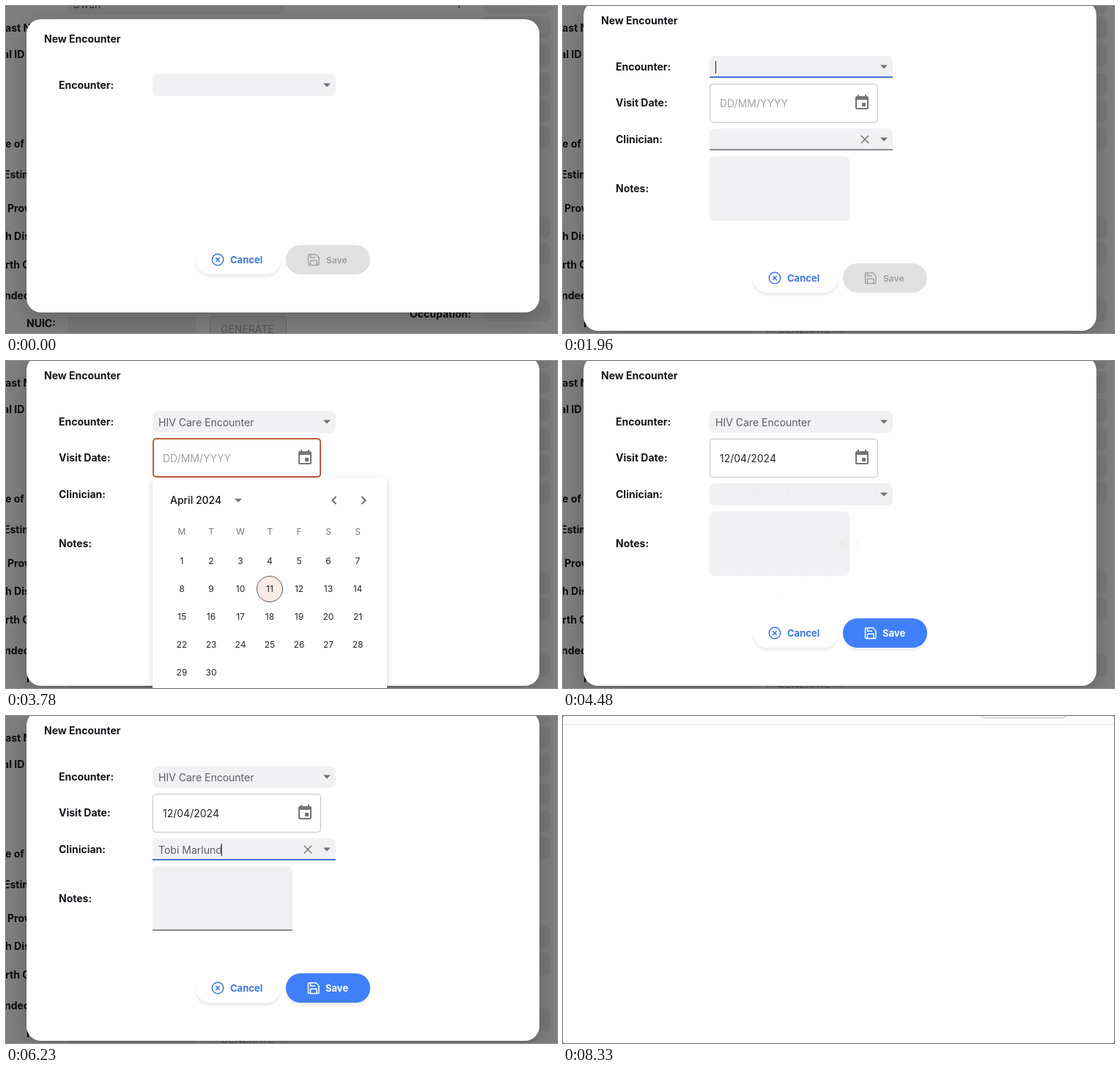
Animation of 752 by 446 pixels, one loop 8.61 s. Source, as an HTML page:

```html
<!DOCTYPE html>
<html lang="en">
<head>
<meta charset="utf-8">
<title>New Encounter</title>
<style>
html, body { margin: 0; width: 100%; height: 100%; overflow: hidden; background: #fff; }
svg { display: block; width: 752px; height: 446px; font: 400 14px Inter, sans-serif; }
.b { font-weight: 700; }
.mid { text-anchor: middle; }
.fit { transform-box: fill-box; transform-origin: center; }
.dialog { filter: drop-shadow(0 9px 16px rgba(0,0,0,.22)); }
.pill { filter: drop-shadow(0 4px 1.5px rgba(0,0,0,.07)); }
.lift { filter: drop-shadow(0 2px 1.5px rgba(0,0,0,.32)); }
.menu { filter: drop-shadow(0 1px 1.5px rgba(0,0,0,.28)); }
.sheet { filter: drop-shadow(0 3px 5px rgba(0,0,0,.16)); }
</style>
</head>
<body>
<svg id="stage" viewBox="0 0 752 446"></svg>
<script>
const LOOP = 8610;
const BLUE = '#3f78dc', INK = '#15151b', SOFT = '#f1f1f3', RUST = '#c05c3a', GREY = '#757575';
const EASE = 'cubic-bezier(.4,0,.2,1)', OUT = 'cubic-bezier(0,0,.2,1)';
const stage = document.getElementById('stage');

// drawing helpers
function add(parent, tag, attrs = {}, text) {
  const n = document.createElementNS('http://www.w3.org/2000/svg', tag);
  for (const k in attrs) n.setAttribute(k, attrs[k]);
  if (text !== undefined) n.textContent = text;
  parent.appendChild(n);
  return n;
}
const group = (p, attrs) => add(p, 'g', attrs);
const rect = (p, x, y, width, height, fill, rx = 0, more) =>
  add(p, 'rect', { x, y, width, height, fill, rx, ...more });
const text = (p, x, y, s, fill = INK, more) => add(p, 'text', { x, y, fill, ...more }, s);
const bold = (p, x, y, s, fill = INK, more) => text(p, x, y, s, fill, { class: 'b', ...more });
const line = (p, d, stroke, w, more) =>
  add(p, 'path', { d, stroke, 'stroke-width': w, fill: 'none', ...more });
const caret = (p, x, y) => rect(p, x, y, 1, 17, '#222');

// timing helpers: keys are [ms, value, easing]; both ends of the loop get one key each
function track(node, prop, keys) {
  const first = keys[0], last = keys[keys.length - 1], all = [...keys];
  if (first[0] > 0) all.unshift([0, first[1]]);
  if (last[0] < LOOP) all.push([LOOP, last[1]]);
  node.animate(all.map(([t, v, easing = 'linear']) => ({ offset: t / LOOP, [prop]: v, easing })),
    { duration: LOOP, iterations: Infinity });
}
function pulse(node, prop, off, on, rise, fall, spans, ease) {
  track(node, prop, spans.flatMap(([a, b = LOOP]) => [
    ...(a > 0 ? [[a, off, ease], [a + rise, on]] : [[0, on]]),
    ...(b < LOOP ? [[b, on, ease], [b + fall, off]] : [[LOOP, on]])]));
}
const show = (node, ...spans) => pulse(node, 'opacity', 0, 1, 0, 0, spans);
const fade = (node, ms, ...spans) => pulse(node, 'opacity', 0, 1, ms, ms, spans);
const widen = (node, ...spans) => pulse(node, 'transform', 'scaleX(0)', 'scaleX(1)', 200, 200, spans, OUT);

// page behind the dialog
const page = group(stage);
rect(page, 0, 0, 752, 446, '#fff');
rect(page, 84, -20, 296, 32, SOFT, 7);
text(page, 91, 3, 'Owen', '#555');
bold(page, 630, -1, 'Group:', INK, { 'text-anchor': 'end' });
[-20, 14, 52, 92, 128, 165, 287, 323, 400].forEach(y => rect(page, 652, y, 91, 30, SOFT, 7));
rect(page, 84, 424, 176, 30, SOFT, 7);
[['ast Name:', -1, 30], ['al ID', -4, 66], ['e of Birth:', -1, 188], ['Estimated:', -3, 230],
 ['Province:', 2, 276], ['h District:', -1, 314], ['rth Country:', -1, 353], ['nded:', -2, 395],
 ['NUIC:', 28, 433], ['Occupation:', 551, 420]].forEach(([s, x, y]) => bold(page, x, y + 5, s));
rect(page, 278.5, 423.5, 104, 36, '#f4f4f4', 4, { stroke: '#cfcfcf' });
text(page, 293, 446, 'GENERATE', '#a8a8a8');

const blank = group(stage);
rect(blank, 0, 0, 752, 446, '#fff');
rect(blank, 0, 11, 752, 1, '#dedede');
rect(blank, 566.5, -30, 124, 32.5, 'none', 10, { stroke: '#b4b4b8' });
show(blank, [7980]);

// dialog
const modal = group(stage);
track(modal, 'opacity', [[7850, 1, EASE], [8310, 0]]);
rect(modal, 0, 0, 752, 446, 'rgba(0,0,0,.5)');
const small = rect(modal, 28, 18, 700, 400, '#fff', 20, { class: 'dialog' });
const large = rect(modal, 28, -7, 700, 450, '#fff', 20, { class: 'dialog' });
show(small, [0, 1960]);
show(large, [1960]);

const head = group(modal), foot = group(modal), rest = group(modal);
const shift = (g, y) => pulse(g, 'transform', 'translate(0,0)', `translate(0,${y}px)`, 0, 0, [[0, 1960]]);
shift(head, 25);
shift(foot, -25);
show(rest, [1960]);

function underlines(p, y, w) {
  return {
    grey: rect(p, 200, y, w, 2, '#8c8c92'),
    blue: rect(p, 200, y, w, 2, BLUE, 0, { class: 'fit' })
  };
}
function select(p, y) {
  rect(p, 200, y, 250, 30, SOFT, 7);
  const halo = add(p, 'circle', { cx: 437.5, cy: y + 14, r: 12.3, fill: '#e2e2e5' });
  const arrow = add(p, 'path', { d: `M433 ${y + 12.5}h10l-5 5z`, fill: '#6f6f74', class: 'fit' });
  return { halo, arrow, ...underlines(p, y + 28, 250) };
}
function menu(p, y, names) {
  const g = group(p);
  rect(g, 200, y, 250, 88, '#fff', 4, { class: 'menu' });
  const rows = names.map((s, i) => text(g, 224, y + 30.5 + 36 * i, s, '#55555c', { 'font-size': 12.5 }));
  return { g, rows };
}
const flip = (node, a, b) => pulse(node, 'transform', 'scaleY(1)', 'scaleY(-1)', 0, 0, [[a, b]]);
const endOf = node => node.getBBox().x + node.getBBox().width - 1;

// encounter
bold(head, 52, 25, 'New Encounter');
bold(head, 72, 87.5, 'Encounter:');
const enc = select(head, 68);
fade(enc.halo, 120, [770, 1080]);
flip(enc.arrow, 770, 1960);
fade(enc.grey, 200, [240, 1200]);
widen(enc.blue, [750, 3130]);
const encText = text(head, 208, 89, 'HIV Care Encounter', '#5c5c66');
show(encText, [2030]);
show(caret(head, 208, 75), [770, 1330], [1820, 2030]);
show(caret(head, endOf(encText), 75), [2030, 2520]);
const encMenu = menu(head, 98, ['Initial Encounter', 'HIV Care Encounter']);
show(encMenu.g, [770, 1960]);

// visit date
bold(rest, 72, 137, 'Visit Date:');
rect(rest, 200.5, 106.5, 229, 52, '#fff', 4, { stroke: '#c4c4c8' });
const dark = rect(rest, 200.5, 106.5, 229, 52, 'none', 4, { stroke: '#222' });
const rust = rect(rest, 201, 106, 228, 52, 'none', 4, { stroke: RUST, 'stroke-width': 2 });
fade(dark, 60, [2650, 3150]);
fade(rust, 120, [3130, 4220]);
show(text(rest, 214, 138, 'DD/MM/YYYY', '#a3a3a6'), [1960, 4200]);
show(text(rest, 214, 138, '12/04/2024', '#26262b'), [4200]);
add(rest, 'path', {
  transform: 'translate(396 120)', fill: GREY,
  d: 'M17 12h-5v5h5zM16 1v2H8V1H6v2H5a2 2 0 0 0-2 2v14a2 2 0 0 0 2 2h14a2 2 0 0 0 2-2V5a2 2 0 0 0-2-2h-1V1zM19 19H5V8h14z'
});

// clinician
bold(rest, 72, 187, 'Clinician:');
const cli = select(rest, 167);
cli.halo.remove();
flip(cli.arrow, 5040, 6230);
fade(cli.grey, 200, [0, 2500], [4650, 5250]);
widen(cli.blue, [5020, 6770]);
const clear = line(rest, 'M406.8 176.8l10.4 10.4m0-10.4l-10.4 10.4', GREY, 1.5);
show(clear, [1960, 2520], [4690, 6790]);
const cliText = text(rest, 208, 188, 'Tobi Marlund', '#5c5c66');
show(cliText, [6230]);
show(caret(rest, 208, 174), [5040, 5600], [6090, 6230]);
show(caret(rest, endOf(cliText), 174), [6230, 6790]);

// notes
bold(rest, 72, 254, 'Notes:');
rect(rest, 200, 205, 191, 88, SOFT, 7);
const notes = underlines(rest, 291, 191);
show(notes.grey, [6230, 7070]);
widen(notes.blue, [6770]);
show(caret(rest, 208, 210), [6790, 7280]);

// buttons
rect(foot, 259, 351, 116, 40, '#fff', 20, { class: 'pill' });
add(foot, 'circle', { cx: 289, cy: 371, r: 7.7, fill: 'none', stroke: BLUE, 'stroke-width': 1.5 });
line(foot, 'M286.4 368.4l5.2 5.2m0-5.2l-5.2 5.2', BLUE, 1.5);
bold(foot, 306, 375.7, 'Cancel', BLUE, { 'font-size': 13 });
function saveButton(fill, ink, size, cls) {
  const g = group(foot);
  rect(g, 382, 351, 115, 40, fill, 20, { class: cls });
  line(g, 'M414 364h9l4 4v9q0 1.5-1.5 1.5h-11.5q-1.5 0-1.5-1.5v-11.5q0-1.5 1.5-1.5zM415.5 364v4.2h6.5M415.5 378.3v-6h8.5v6',
    ink, 1.5, { 'stroke-linejoin': 'round' });
  bold(g, size === 12 ? 437 : 436, 375.7, 'Save', ink, { 'font-size': size });
  return g;
}
saveButton('#e1e1e1', '#a3a3a6', 12, '');
fade(saveButton('#3f7ffa', '#fff', 13, 'pill'), 220, [4190]);
fade(saveButton('#fff', BLUE, 13, 'lift'), 110, [7235]);

// clinician menu
const cliMenu = menu(modal, 197, ['Tobi Marlund', 'Ines Varholt']);
show(cliMenu.g, [5040, 6230]);
const mark = (row, ...spans) => pulse(row, 'fill', '#55555c', BLUE, 0, 0, spans);
mark(cliMenu.rows[0], [5390, 5460], [5950, 6230]);
mark(cliMenu.rows[1], [5460, 5950]);

// calendar
const cal = group(modal);
cal.style.transformOrigin = '360px 159px';
rect(cal, 200, 159, 320, 334, '#fff', 4, { class: 'sheet' });
text(cal, 224, 195, 'April 2024', INK, { 'font-weight': 500 });
add(cal, 'path', { d: 'M312 187.8h10l-5 5z', fill: GREY });
line(cal, 'M450.5 184.8l-5 5.2 5 5.2M485.5 184.8l5 5.2-5 5.2', '#666', 1.9);
[...'MTWTFSS'].forEach((s, i) =>
  text(cal, 240 + 40 * i, 237.3, s, '#77777c', { class: 'mid', 'font-size': 12 }));
add(cal, 'circle', { cx: 360, cy: 311, r: 17.5, fill: '#fbebe7', stroke: '#66504c' });
for (let d = 1; d <= 30; d++) {
  const x = 240 + (d - 1) % 7 * 40, y = 273 + Math.floor((d - 1) / 7) * 38;
  text(cal, x, y + 4.3, d, '#24242a', { class: 'mid', 'font-size': 12 });
}
const pick = group(cal);
add(pick, 'circle', { cx: 400, cy: 311, r: 18, fill: RUST });
text(pick, 400, 315.3, 12, '#fff', { class: 'mid', 'font-size': 12 });
show(pick, [4200, 4700]);
track(cal, 'opacity', [[3120, 0, EASE], [3540, 1], [4230, 1, EASE], [4550, 0]]);
const tiny = 'scale(.75,.5625)';
track(cal, 'transform', [[3120, tiny, EASE], [3400, 'scale(1,1)'], [4337, 'scale(1,1)', EASE], [4550, tiny]]);

// rounded window corners
add(stage, 'path', {
  fill: '#4a4a4a', 'fill-rule': 'evenodd',
  d: 'M0 0h752v446H0zM2 0a2 2 0 0 0-2 2v442a2 2 0 0 0 2 2h748a2 2 0 0 0 2-2V2a2 2 0 0 0-2-2z'
});
</script>
</body>
</html>
```
